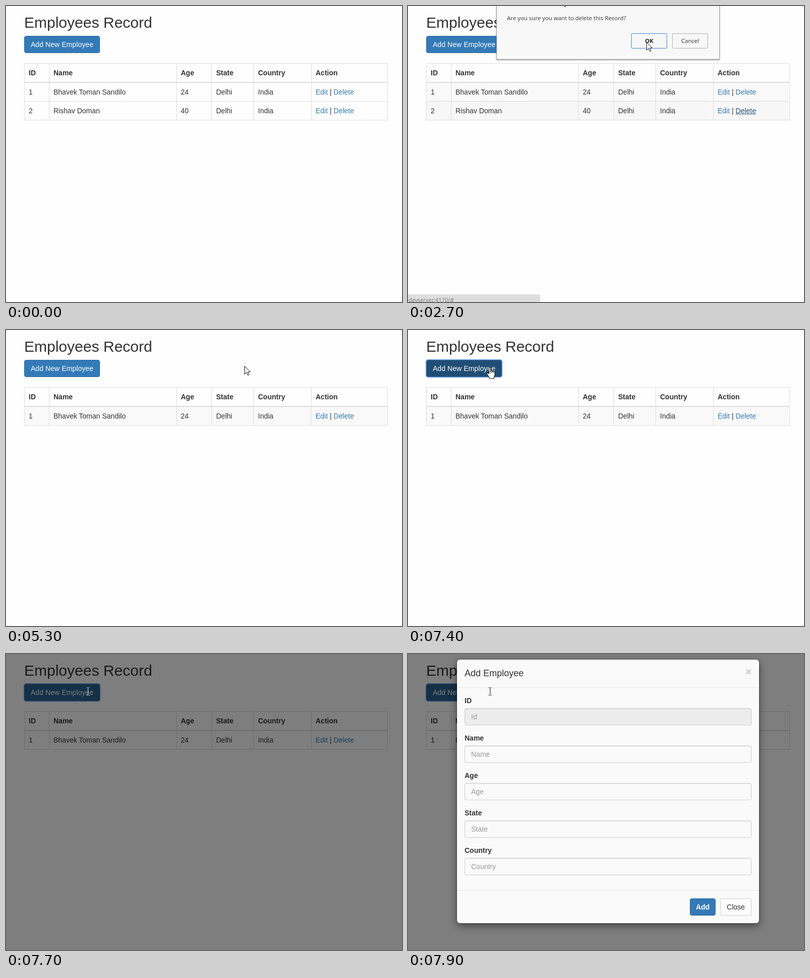
Animation of 784 by 585 pixels, one loop 8000 ms. Source, as an HTML page:

```html
<!DOCTYPE html>
<html lang="en">
<head>
<meta charset="utf-8">
<title>Employees Record</title>
<style>
  * { box-sizing: border-box; }
  html, body { margin: 0; width: 100%; height: 100%; overflow: hidden; }
  body {
    position: relative; background: #fefefe; color: #333;
    font: 14px/20px "Liberation Sans", Arial, sans-serif;
  }
  body > *, .confirm > *, .modal > * { position: absolute; }

  /* every animated part shares one stepped clock */
  .confirm, .status, .shade, .modal, .new, .first, .second, .hot,
  .cursor, .arrow, .hand, .beam { animation: 8s step-end -20ms infinite; }

  h2 { left: 36px; top: 16px; margin: 0; font: 500 30px/33px "Liberation Sans", Arial, sans-serif; }
  .btn {
    height: 34px; padding: 6px 0; text-align: center; color: #fff;
    background: #337ab7; border: 1px solid #2e6da4; border-radius: 4px;
  }
  .new { left: 36px; top: 59px; width: 150px; letter-spacing: .07px; animation-name: press; }

  .row {
    left: 36px; width: 720px; display: grid;
    grid-template-columns: 49px 252px 70px 83px 114px 151px;
    border: solid #ddd; border-width: 0 1px 1px 0;
  }
  .row > * { padding: 8px; border-left: 1px solid #ddd; }
  .head { top: 113px; border-width: 1px 1px 2px 0; font-weight: bold; }
  .first { top: 152px; animation-name: first; }
  .second { top: 189px; animation-name: second; }
  .row i { font-style: normal; color: #337ab7; }
  .row .hot { animation-name: link; }

  .confirm, .status { font: 11.4px/16px "Open Sans", "Noto Sans", sans-serif; color: #333; }
  .confirm {
    left: 175px; top: -10px; width: 442px; height: 116px;
    background: #f8f8f8; border: 1px solid #a4a4a4; border-bottom-color: #888;
    box-shadow: 0 1px 3px rgba(0,0,0,.35); animation-name: confirm;
  }
  .confirm p { left: 20px; top: 25px; margin: 0; white-space: nowrap; }
  .confirm small { left: 133px; top: -9px; font-size: 16px; line-height: 20px; }
  .confirm b, .confirm span {
    top: 63px; width: 71px; height: 30px; line-height: 27px; text-align: center;
    background: #f7f7f7; border: 1px solid #b0b0b0; border-radius: 2px;
  }
  .confirm b { left: 266px; border-color: #4080e0; color: #222; }
  .confirm span { left: 347px; }

  .status {
    left: 0; top: 570px; width: 262px; height: 24px; padding: 3px 1px;
    font-size: 11px; color: #777; background: #dedede; border-radius: 0 4px 0 0;
    animation-name: status;
  }

  .shade { inset: 0; background: #000; animation-name: shade; }
  .modal {
    left: 97px; top: 11px; width: 598px; height: 521px; background: #fafafa;
    border-radius: 6px; box-shadow: 0 0 0 1px rgba(0,0,0,.2), 0 5px 15px rgba(0,0,0,.5);
    animation-name: modal;
  }
  .modal h4 { left: 15px; top: 14px; margin: 0; font: 500 18px/26px "Liberation Sans", Arial, sans-serif; }
  .modal .x { left: 571px; top: 13px; font: bold 21px/21px "Liberation Sans", Arial, sans-serif; color: #c8c8c8; }
  .modal hr { left: 0; width: 100%; height: 1px; margin: 0; border: 0; background: #e6e6e6; }
  .fields { left: 15px; top: 71px; width: 568px; }
  .fields label { display: block; height: 74px; font-weight: bold; }
  .fields span {
    display: block; height: 34px; margin-top: 5px; padding: 6px 12px;
    font-weight: normal; color: #999; border: 1px solid #ccc; border-radius: 4px;
    box-shadow: inset 0 1px 1px rgba(0,0,0,.07);
  }
  .fields label:first-child span { background: #ececec; }
  .modal .btn { top: 472px; }
  .add { left: 461px; width: 51px; font-weight: bold; }
  .modal .close { left: 521px; width: 62px; color: #333; background: #fcfcfc; border-color: #ccc; }

  .cursor { left: 0; top: 0; overflow: visible; animation-name: move; }
  .arrow { animation-name: arrow; }
  .hand { animation-name: hand; }
  .beam { animation-name: beam; }

  @keyframes move {
    0%, 3.75% { transform: translate(774px, 57px); }
    5% { transform: translate(698px, 170px); }
    6.25% { transform: translate(681px, 206px); }
    16.25% { transform: translate(680px, 206px); }
    23.75% { transform: translate(565px, 133px); }
    25% { transform: translate(510px, 98px); }
    26.25% { transform: translate(480px, 80px); }
    27.5% { transform: translate(471px, 73px); }
    28.75% { transform: translate(467px, 71px); }
    32.5% { transform: translate(470px, 71px); }
    33.75% { transform: translate(472px, 71px); }
    77.5% { transform: translate(366px, 71px); }
    78.75% { transform: translate(262px, 68px); }
    80% { transform: translate(236px, 68px); }
    81.25% { transform: translate(198px, 67px); }
    82.5% { transform: translate(162px, 73px); }
    96.25%, 100% { transform: translate(162px, 74px); }
  }
  @keyframes arrow {
    0%, 6.25%, 82.5%, 100% { opacity: 0; }
    3.75%, 16.25% { opacity: 1; }
  }
  @keyframes hand {
    0%, 16.25%, 96.25%, 100% { opacity: 0; }
    6.25%, 82.5% { opacity: 1; }
  }
  @keyframes beam {
    0% { opacity: 0; color: #ddd; }
    96.25% { opacity: 1; color: #ddd; }
    97.5%, 100% { opacity: 1; color: #111; }
  }
  @keyframes first {
    0%, 95%, 100% { background: none; }
    5% { background: #f9f9f9; }
  }
  @keyframes second {
    0% { background: none; visibility: visible; }
    6.25% { background: #f7f7f7; visibility: visible; }
    62.5%, 100% { background: none; visibility: hidden; }
  }
  @keyframes link {
    0% { color: #337ab7; text-decoration: none; }
    6.25%, 100% { color: #23527c; text-decoration: underline; }
  }
  @keyframes status {
    0%, 66.25%, 100% { opacity: 0; }
    8.75% { opacity: .25; }
    10%, 65% { opacity: .5; }
    11.25% { opacity: .75; }
    12.5% { opacity: 1; }
  }
  @keyframes confirm {
    0%, 61.25%, 100% { opacity: 0; }
    18.75%, 60% { opacity: .5; }
    20% { opacity: 1; }
  }
  @keyframes press {
    0% { background: #337ab7; border-color: #2e6da4; box-shadow: none; }
    82.5% { background: #286090; border-color: #204d74; box-shadow: none; }
    92.5% { background: #204d74; border-color: #3f72b4; box-shadow: 0 0 1px 1px #6fa3ea; }
    95%, 100% { background: #286090; border-color: #3f72b4; box-shadow: 0 0 1px 1px #6fa3ea; }
  }
  @keyframes shade {
    0% { opacity: 0; }
    95% { opacity: .25; }
    96.25%, 100% { opacity: .5; }
  }
  @keyframes modal {
    0% { opacity: 0; transform: none; }
    97.5% { opacity: .3; transform: translateY(-50px); }
    98.75%, 100% { opacity: 1; transform: none; }
  }
</style>
</head>
<body>
  <h2>Employees Record</h2>
  <div class="btn new">Add New Employee</div>

  <div class="row head"><div>ID</div><div>Name</div><div>Age</div><div>State</div><div>Country</div><div>Action</div></div>
  <div class="row first"><div>1</div><div>Bhavek Toman Sandilo</div><div>24</div><div>Delhi</div><div>India</div><div><i>Edit</i> | <i>Delete</i></div></div>
  <div class="row second"><div>2</div><div>Rishav Doman</div><div>40</div><div>Delhi</div><div>India</div><div><i>Edit</i> | <i class="hot">Delete</i></div></div>

  <div class="status">devserver:4170/#</div>
  <div class="confirm">
    <small>y</small>
    <p>Are you sure you want to delete this Record?</p>
    <b>OK</b><span>Cancel</span>
  </div>

  <div class="shade"></div>
  <div class="modal">
    <h4>Add Employee</h4><div class="x">×</div>
    <hr style="top:55px">
    <div class="fields">
      <label>ID<span>Id</span></label>
      <label>Name<span>Name</span></label>
      <label>Age<span>Age</span></label>
      <label>State<span>State</span></label>
      <label>Country<span>Country</span></label>
    </div>
    <hr style="top:456px">
    <div class="btn add">Add</div>
    <div class="btn close">Close</div>
  </div>

  <svg class="cursor" width="24" height="24" fill="#fff" stroke="#111" stroke-linejoin="round">
    <g class="arrow"><path d="M.5.5v16l3.7-3.6 2.6 5.6 2.3-1-2.5-5.5h5z"/></g>
    <g class="hand"><path transform="translate(-7)" stroke-width="1.2" d="M5.5 13V2.2C5.5.1 8.6.1 8.6 2.2V8c.3-1.3 2.8-1.2 3 .4.5-1 2.7-.8 2.8.7.8-.9 2.6-.3 2.6 1.2v5c0 3-2 4-2 7.7H6.5C6.5 20 1.2 15.5 1 13.3c-.2-1.5 1.8-2 3-.8zM8.6 8v3.5M11.6 8.4v3.1M14.4 9.1v2.6"/></g>
    <g class="beam"><path fill="none" stroke="currentColor" d="M-2.5-7.5h2l1 1 1-1h2M.5-6.5v13M-2.5 7.5h2l1-1 1 1h2"/></g>
  </svg>
</body>
</html>
```
